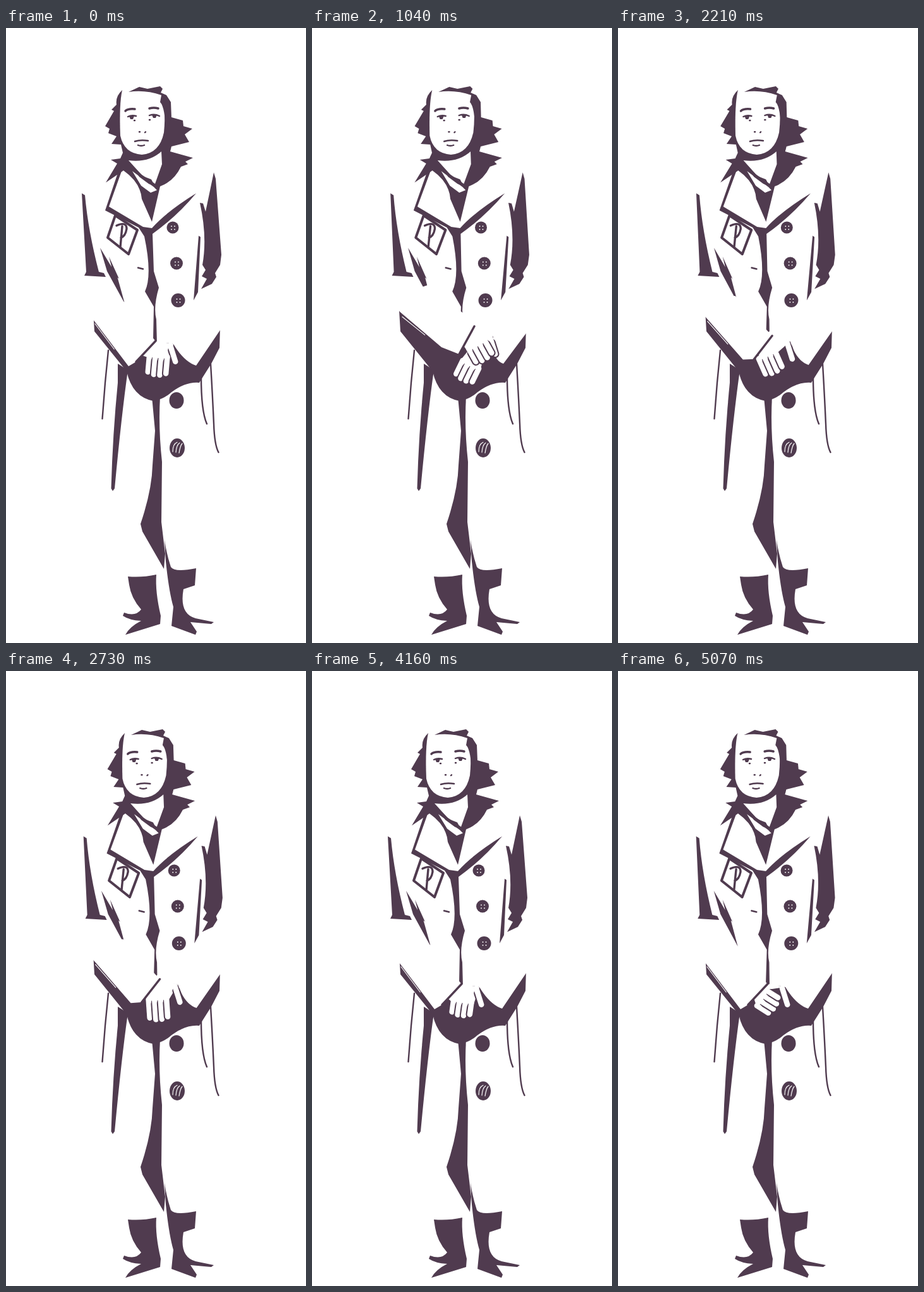
Animation, 475 px wide and 971 px high, one loop 5.2 s. Source, as an HTML page:

```html
<!DOCTYPE html>
<html lang="en">
<head>
<meta charset="utf-8">
<title>Standing figure</title>
<style>
  html, body { margin: 0; width: 100%; height: 100%; overflow: hidden; background: #fff; }
  svg { display: block; width: 100%; height: 100%; }
  .ink { fill: #503b4f; }
  .paper { fill: #fff; }
  .line, .scratch { fill: none; stroke: #503b4f; stroke-width: 2.4; stroke-linecap: round; stroke-linejoin: round; }
  .scratch { stroke: #fff; stroke-width: 1.2; }
  .bold { stroke-width: 3.4; }
</style>
</head>
<body>
<svg viewBox="0 0 475 971">
  <!-- coat tails, legs and boots -->
  <g id="coat">
    <path class="line" d="M162 509L157 560 152.500 617M309 550Q309 605 318 625M324 530Q327 580 329 625 330 658 336.500 670" />
    <path class="ink" d="M177 530L193 540Q183 610 172 727L169 731 166.500 727Q169 640 177 560Z" />
    <path class="ink" d="M231 582H244Q241 630 247 685L246 780 252 830 250 854 216 795 213 783Q231 730 232 690L236 636Z" />
    <path class="ink" d="M251 808Q254 830 261 851 267 860 301 853L299 880 281 886Q274 925 300 932L329 938 325 941 292 938 302 953 300 958 262 944 265 914Q258 890 253 842Z" />
    <path class="ink" d="M193 866Q215 868 238 863 236 890 245 928L244 941 189 958Q196 945 214 936 195 935 185 928L187 923Q205 930 214 918 198 900 195 879Z" />
  </g>

  <g id="torso">
    <!-- hair and collar -->
    <path class="ink" d="M184 98Q173 108 175 121L167 129 171 131 157 155 164 159 162 166 175 171 167 183 182 184 185 197 181 206 166 208 176 214 158 244 186 225Q213 244 215 270L231 306 244 250Q266 242 277 219L288 215 284 211 296 205 260 195 262 187 290 180 283 168 295 159 281 155 280 146 262 141Z" />
    <path class="paper" d="M184 98Q179 120 181 170 187 198 215 200 243 198 250 165 254 125 245 102Z" />
    <path class="ink" d="M194 101L211 93 224 96 244 92 248 96 245 102 254 106 261 117 262 142 253 165Q252 125 244 117L246 106Q220 97 194 101Z" />
    <path class="paper" d="M194 209Q226 213 246 195L247 215 236 246 214 231ZM200 226L234 251 239 256 229 260 214 249Z" />
    <path class="ink" d="M195 212L217 234 230 239 236 250 226 246 211 235Z" />
    <!-- face -->
    <path class="line bold" d="M189 131Q193 127 204 128M227 127Q234 125 241 127" />
    <path class="line" d="M204 179Q213 176 225 178M209 185Q214 187 219 185M211 164h1M221 164l-1 1M227 145h1M203 146h1" />
    <g id="open">
      <path class="line" d="M193 140Q199 137 206 139M227 138Q235 135 243 139" />
      <path class="ink" d="M195 139h8l-2 5h-4zM231 137h8l-2 5h-4z" />
    </g>
    <path id="shut" class="line" d="M193 140Q200 143 206 140M228 138Q236 141 243 138" />
    <!-- lapels, front edge, badge -->
    <path class="ink" d="M178 226L183 226 163 282 217 314 231 316Q254 290 301 261 270 298 232 325L234 384 242 410Q233 440 238 460L239 499 233 492 234 440 220 416Q232 390 219 329L210 315 157 288Z" />
    <path class="line" style="stroke-width:4;stroke-linecap:butt" d="M173 296L208 319 194 357 161 331Z" />
    <path class="line bold" d="M184 313L181 346M175 312Q191 305 191 317 189 329 182 331" />
    <path class="line" d="M209 378.500L217 380.500" />
    <!-- sleeves -->
    <path class="ink" d="M120 261L125 264Q130 320 147 385L155 387 158 393 124 391 127 385Z" />
    <path class="ink" d="M329 228L332 238 341 358 339 374 331 387 333 393 326 404 309 412 318 396 310 392 316 382 311 374Q319 330 307 276L312 277 316 290Z" />
    <path class="ink" d="M305 328L308 330 304 417 297 430ZM149 347L176 392 188 435 160 384ZM163 361L179 396 170 388Z" />
  </g>

  <!-- shade under the forearms, then forearms and hands -->
  <path class="ink" d="M138 446L140 479 191 542Q200 583 234 589 250 586 262 575 285 558 306 560L325 530 338 505 339 472 285 486 255 497 240 499Z" />
  <path id="arms" class="paper" />
  <path id="fold" class="scratch" />
  <path id="under" class="paper" />
  <g id="hands"></g>
  <path id="cuff" class="line bold" />
</svg>

<script>
const LOOP = 5200, STEP = 130, PIVOT = 590, LEAN = 0.0142;
const $ = id => document.getElementById(id);
const set = (el, attrs) => { for (const k in attrs) el.setAttribute(k, attrs[k]); return el; };
const add = (parent, tag, attrs) =>
  set(parent.appendChild(document.createElementNS("http://www.w3.org/2000/svg", tag)), attrs);

// buttons
function button(parent, x, y, rx, ry) {
  add(parent, "ellipse", { class: "ink", cx: x, cy: y, rx, ry });
}
for (const [x, y, r] of [[264, 315, 9.5], [270, 371.5, 10], [272.5, 430, 11]]) {
  button($("torso"), x, y, r, r);
  for (const dx of [-2, 3]) for (const dy of [-2, 3])
    add($("torso"), "circle", { class: "paper", cx: x + dx, cy: y + dy, r: .9 });
}
button($("coat"), 270, 588, 11.5, 13);
button($("coat"), 271, 663, 12, 15);
for (const i of [0, 1, 2])
  add($("coat"), "path", { class: "scratch", d: `M${264 + 5 * i} ${669 + i}q${i} -12 ${7 - i} -15` });

// motion: [time, ...values]
const sway = [[0, 0], [1300, 1], [1560, 1], [4160, 0], [5460, 1]];
const lift = [[0, 0], [520, 1], [1560, 1], [2210, .35], [3250, .3], [4160, 0], [LOOP, 0]];
// knuckle centre x, y, finger angle, finger length
const upper = [
  [0, 241, 521, 95, 27], [520, 251, 509, 67, 27], [1040, 262, 502, 61, 24], [1560, 262, 502, 61, 24],
  [2210, 237, 519, 66, 27], [3250, 243, 521, 106, 34], [4160, 238, 524, 98, 20], [5070, 230, 518, 32, 22], [LOOP, 230, 518, 32, 22]
];
const lower = [[520, 248, 544, 92, 22], [1040, 250, 534, 116, 24], [1560, 250, 534, 116, 24]];

const mix = (a, b, u) => a + (b - a) * u;
const ease = u => u * u * (3 - 2 * u);

function track(keys, t) {
  let i = 0;
  while (i < keys.length - 2 && t >= keys[i + 1][0]) i++;
  const a = keys[i], b = keys[i + 1];
  const u = Math.max(0, Math.min(1, (t - a[0]) / (b[0] - a[0])));
  return a.slice(1).map((v, j) => mix(v, b[j + 1], ease(u)));
}

const limbs = Array.from({ length: 9 }, () => ({
  edge: add($("hands"), "path", { class: "line", style: "stroke-width:12.5" }),
  skin: add($("hands"), "path", { class: "scratch", style: "stroke-width:8.5" })
}));

// a finger: dark rim, open towards the knuckle
function finger({ edge, skin }, x, y, vx, vy, len) {
  const line = from => `M${x + vx * from} ${y + vy * from}L${x + vx * len} ${y + vy * len}`;
  set(edge, { d: line(5) });
  set(skin, { d: line(-3) });
}

// four fingers side by side; returns the ends of the knuckle row
function hand(first, [x, y, angle, len]) {
  const a = angle * Math.PI / 180, vx = Math.cos(a), vy = Math.sin(a);
  const along = n => [x + vy * n, y - vx * n];
  for (let i = 0; i < 4; i++) {
    const off = i - 1.5;
    finger(limbs[first + i], ...along(off * 9.5), vx, vy, len - off * off * 1.6);
  }
  return [along(18), along(-18)];
}

const poly = pts => "M" + pts.map(p => p.join(" ")).join("L") + "Z";

function draw(now) {
  const t = Math.floor((now % LOOP) / STEP) * STEP;

  const k = LEAN * track(sway, t)[0];
  set($("torso"), { transform: `matrix(1 0 ${-k} 1 ${k * PIVOT} 0)` });

  const blink = t >= 3120 && t < 3380;
  $("open").style.display = blink ? "none" : "";
  $("shut").style.display = blink ? "" : "none";

  const [up] = track(lift, t);
  const at = (x, y, dx, dy) => [x + dx * up, y + dy * up];
  const fore = at(187, 432, -4, -26), front = at(238, 496, 1, -46);
  const tip = at(339, 477, 0, 5), bend = at(301, 533, 2, -3), thumb = at(265, 499, 22, -12);
  const cuffTop = at(237, 494, 20, -23), cuffEnd = at(206, 527, 27, -12);
  const elbow = at(194, 534, 11, -30), hem = at(137, 459, 2, -11);

  set($("arms"), {
    d: `M126 425L${fore} ${front} 290 443 352 440 ${tip} ${bend}` +
       `Q${bend[0] - 19} ${bend[1] - 6} ${thumb}L${cuffTop} ${cuffEnd} ${elbow} ${hem}Z`
  });
  set($("cuff"), { d: `M${cuffEnd}L${cuffTop}` });
  set($("fold"), { d: `M${hem[0] + 4} ${hem[1] + 8}L${mix(hem[0], elbow[0], .6)} ${mix(hem[1], elbow[1], .6) + 3}` });

  const both = up > .6;
  for (const { edge, skin } of limbs.slice(0, 4)) edge.style.display = skin.style.display = both ? "" : "none";
  const ends = both ? hand(0, track(lower, t)) : [];
  const [right, left] = hand(5, track(upper, t));
  finger(limbs[4], thumb[0] - 4, thumb[1] + 5, .3, .95, 24);

  const wrist = [mix(cuffEnd[0], cuffTop[0], .3), mix(cuffEnd[1], cuffTop[1], .3)];
  set($("under"), { d: poly([cuffTop, thumb, right, ...ends, left, wrist]) });
}

const start = performance.now();
function tick() {
  draw(performance.now() - start);
  requestAnimationFrame(tick);
}
tick();
</script>
</body>
</html>
```
